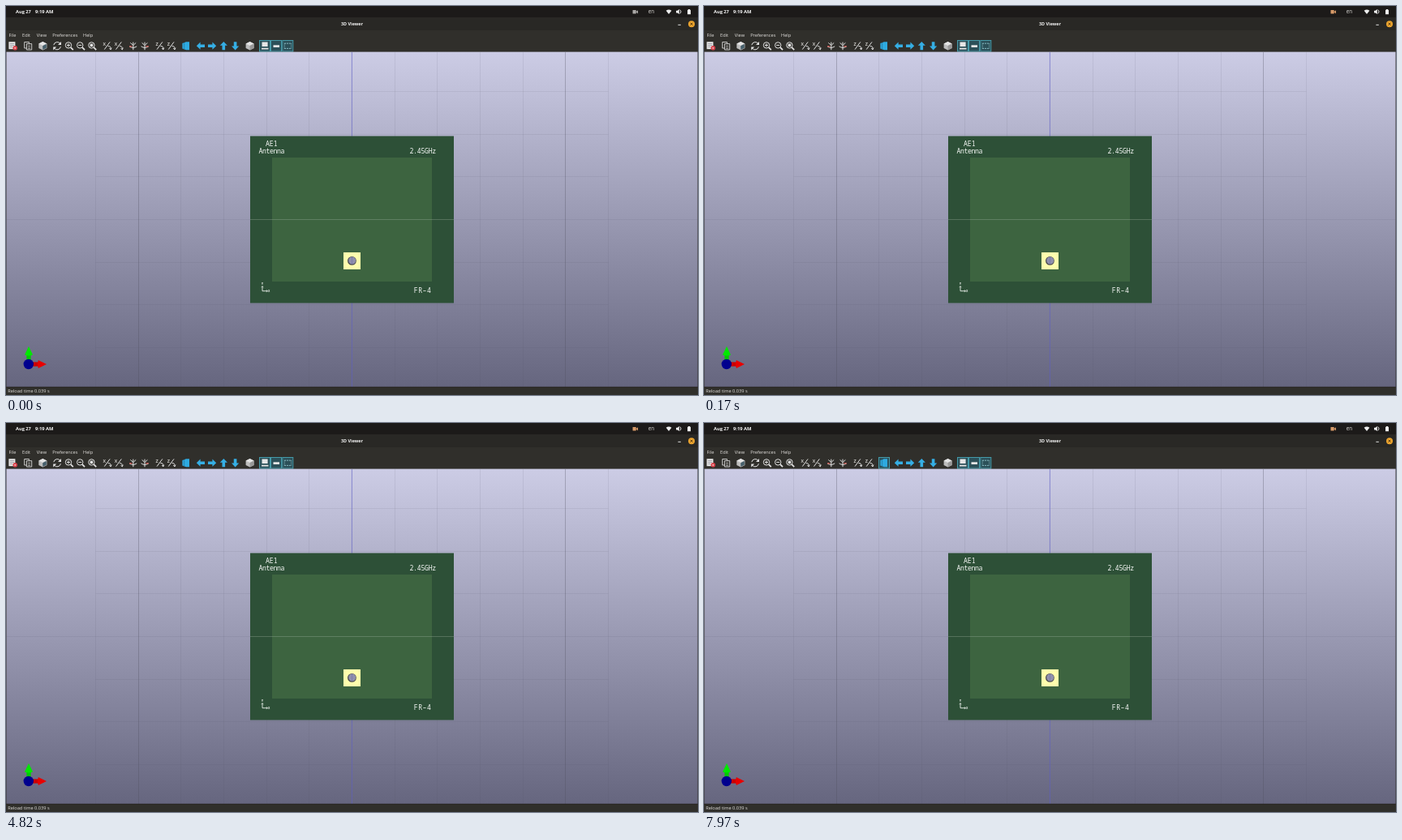
Animation, 853 px wide and 480 px high, one loop 8 s. Source, as an HTML page:

```html
<!DOCTYPE html>
<html lang="en">
<head>
<meta charset="utf-8">
<title>3D Viewer</title>
<style>
  html, body { margin: 0; width: 100%; height: 100%; overflow: hidden; background: #302f2b; }
  svg { display: block; width: 853px; height: 480px; }
  text { font: 5.65px "Open Sans", "Noto Sans", sans-serif; fill: #e4e2df; white-space: pre; }
  .bold { font-weight: 700; fill: #f4f4f4; }
  .silk { font: 500 8.2px "Noto Sans Mono", "DejaVu Sans Mono", monospace; fill: #f6f8f6; }
  .tiny { font-size: 4px; font-weight: 700; }
  .mini { font-size: 5.6px; font-weight: 600; }
  .line { fill: none; stroke: #e2e2e2; stroke-width: 1; }
  .on { fill: #2c5059; stroke: #459aa9; stroke-width: 1; }
  .camera { fill: #aaa8a6; animation: record 8s step-end infinite; }
  .hover { opacity: 0; animation: hover 8s step-end infinite; }
  @keyframes record { 0% { fill: #aaa8a6; } 2.125%, 100% { fill: #d79a68; } }
  @keyframes hover { 0% { opacity: 0; } 99%, 100% { opacity: 1; } }
</style>
</head>
<body>
<svg viewBox="0 0 853 480">
  <defs>
    <linearGradient id="sky" x1="0" y1="0" x2="0" y2="1">
      <stop stop-color="#cccce5"/><stop offset="1" stop-color="#66667f"/>
    </linearGradient>
    <path id="arrow" d="M-5.2 0L-.4-4.6V-1.8H5V1.8H-.4V4.6Z" fill="#35aee4"/>
    <g id="lens" class="line">
      <circle cx="-.8" cy="-.8" r="3.7"/><path d="M2 2L5 5" stroke-width="1.7"/>
    </g>
    <!-- curved arrow around a slanted axis -->
    <path id="turn" class="line" d="M-3.4 4.6L3.4-4.6M1 .6Q4.8 0 4.4 4.6M2.6 3.2L4.4 4.8L5.4 2.6"/>
    <g id="spin">
      <path class="line" d="M0-4.8V4.8M-4.6 .6Q0 3.6 4.4 .4M-3.4-4L-.4-1.2M3.4-4L.4-1.2"/>
      <path d="M-4.8 .4H-1.4" stroke="#d95a54" stroke-width="1.2"/>
    </g>
    <g id="cube">
      <path d="M0-5L5-2.5V3L0 5.5L-5 3V-2.5Z" fill="#bdbdbd"/>
      <path d="M0-5L5-2.5L0 0L-5-2.5Z" fill="#e5e5e5"/>
      <path d="M0 0L5-2.5V3L0 5.5Z" fill="#989898"/>
    </g>
  </defs>

  <!-- desktop bar, title, menus -->
  <rect width="853" height="480" fill="#302f2b"/>
  <rect width="853" height="14" fill="#1c1a19"/>
  <rect y="14" width="853" height="16" fill="#292825"/>
  <text class="bold" x="12" y="9.2" style="font-size:5.7px">Aug 27</text>
  <text class="bold" x="36" y="9.2" style="font-size:5.8px">9:19 AM</text>
  <text class="bold" x="426.5" y="24.2" text-anchor="middle" style="font-size:5.4px">3D Viewer</text>
  <text x="791.7" y="9.2" style="font-size:6.2px">en</text>

  <g class="camera">
    <rect x="772.5" y="5" width="4.2" height="4.6" rx=".6"/>
    <path d="M776.4 7.2L779 5.2V9.4Z"/>
  </g>
  <g fill="#eee">
    <path d="M813.6 5.8Q817 3 820.4 5.8L817 10Z"/>
    <path d="M826 5.8H827.6L829.8 4V10L827.6 8.4H826Z"/>
    <path d="M840 4.7H841V4H843V4.7H844V10.2H840Z"/>
  </g>
  <path d="M830.8 4.6Q833.4 7 830.8 9.4" class="line" stroke-width=".8"/>
  <path d="M828.4 23.3H831.8" class="line"/>
  <circle cx="845" cy="22.2" r="4" fill="#eda52f"/>
  <path d="M843.5 20.7L846.5 23.7M846.5 20.7L843.5 23.7" stroke="#4b3311" stroke-width=".9"/>

  <text x="3.4" y="38">File</text>
  <text x="20" y="38">Edit</text>
  <text x="37.8" y="38">View</text>
  <text x="57.2" y="38">Preferences</text>
  <text x="95" y="38">Help</text>

  <!-- toolbar -->
  <rect x="3.4" y="44.2" width="8" height="9" fill="#e6e6e6"/>
  <path d="M4.8 46.5H10M4.8 48.5H10M4.8 50.5H8" stroke="#92949d" stroke-width=".8"/>
  <circle cx="11.2" cy="51.8" r="2.8" fill="#d8414b"/>
  <circle cx="11.2" cy="51.8" r=".9" fill="#f2dada"/>

  <g fill="#302f2b" stroke="#d8d8d8" stroke-width=".9">
    <path d="M22.7 44.5H28.4V52H22.7Z"/>
    <path d="M25.4 46.6H31.7V54H25.4Z"/>
    <path d="M27 49H30M27 50.8H30M27 52.5H30" stroke-width=".6"/>
  </g>
  <use href="#cube" x="45.3" y="49"/>
  <path d="M45.3 49.2L49.7 47.1V51.7L45.3 53.8Z" fill="#46606c"/>

  <path class="line" d="M58.8 48.2A4.5 4.5 0 0 1 66.8 46.3M67.4 50.2A4.5 4.5 0 0 1 59.4 52.1"/>
  <path d="M68 44V48H64ZM58.2 54.4V50.4H62.2Z" fill="#e2e2e2"/>

  <use href="#lens" x="77.8" y="49.2"/>
  <use href="#lens" x="92" y="49.2"/>
  <use href="#lens" x="106.2" y="49.2"/>
  <path class="line" d="M75 48.4H79M77 46.4V50.4M89.2 48.4H93.2"/>
  <rect x="103.6" y="46.6" width="3.6" height="3.6" fill="#e2e2e2"/>

  <use href="#turn" x="124.7" y="49"/>
  <use href="#turn" x="138.9" y="49"/>
  <text class="mini" x="119.6" y="48.6">X</text>
  <text class="mini" x="133.8" y="48.6">X</text>
  <use href="#spin" x="156.8" y="49.4"/>
  <use href="#spin" transform="translate(171 49.4) scale(-1 1)"/>
  <use href="#turn" x="189.4" y="49"/>
  <use href="#turn" x="203.6" y="49"/>
  <text class="mini" x="184.6" y="48.6">Z</text>
  <text class="mini" x="198.8" y="48.6">Z</text>

  <rect class="on hover" x="215.5" y="42.5" width="13" height="13.5"/>
  <path d="M217.4 46L222 44.2H226V54.2H222L217.4 52.6Z" fill="#2eaae0"/>
  <path d="M219.6 45V54" stroke="#23698a" stroke-dasharray="1.4 1"/>

  <use href="#arrow" x="240" y="49.2"/>
  <use href="#arrow" transform="translate(254 49.2) rotate(180)"/>
  <use href="#arrow" transform="translate(268.3 49.2) rotate(90)"/>
  <use href="#arrow" transform="translate(282.6 49.2) rotate(-90)"/>
  <use href="#cube" x="300.6" y="49"/>

  <g class="on">
    <rect x="312.5" y="42.5" width="13" height="13.5"/>
    <rect x="326.5" y="42.5" width="13" height="13.5"/>
    <rect x="340.8" y="42.5" width="13" height="13.5"/>
  </g>
  <path d="M315.5 44.6H322.6V50H315.5ZM315 51.8H323.5V53.6H315ZM329.5 48.2H337V51H329.5Z" fill="#e6e6e6"/>
  <path d="M343.3 46.2H351.8M343.3 52.4H351.8" stroke="#8fc3cb" stroke-dasharray="1.8 1"/>
  <path d="M343.4 46V52.5M351.6 46V52.5" stroke="#8fc3cb" stroke-width=".7" stroke-dasharray="1.6 1"/>

  <!-- 3D canvas -->
  <rect x=".5" y="56.6" width="852" height="413.4" fill="url(#sky)"/>
  <g id="grid" stroke="#50505f"></g>
  <path d="M426.4 57V470" stroke="#6060c4" stroke-opacity=".62"/>

  <rect x="301" y="160.5" width="251" height="206" fill="#2d5037"/>
  <rect x="328" y="187" width="197" height="153" fill="#3d6440"/>
  <path d="M301 263.5H552" stroke="#9aae9c" stroke-opacity=".36"/>
  <rect x="416" y="304" width="21" height="21" fill="#fffeae"/>
  <circle cx="426.4" cy="314.4" r="5.4" fill="#4c4c50"/>
  <circle cx="426.7" cy="314" r="4.5" fill="#8f8fac"/>
  <path d="M426.5 309.8V318.4" stroke="#7979ad" stroke-width=".8"/>

  <text class="silk" x="320" y="173.4" letter-spacing="-.1">AE1</text>
  <text class="silk" x="311.5" y="182.3" letter-spacing="-.42">Antenna</text>
  <text class="silk" x="497.4" y="182.3" letter-spacing="-.25">2.45GHz</text>
  <text class="silk" x="502.8" y="353.6" letter-spacing=".5">FR–4</text>
  <path d="M316 346V351.7H322" fill="none" stroke="#e8eee8" stroke-width=".9"/>
  <text class="silk tiny" x="314.7" y="344.4">Y</text>
  <text class="silk tiny" x="323" y="353.2">X</text>
  <path d="M314.8 347.2L316 345.5L317.2 347.2M320.8 350.5L322.8 351.7L320.8 352.9" fill="none" stroke="#e8eee8" stroke-width=".7"/>

  <!-- axis gizmo -->
  <path d="M25.4 430H30.6V440H25.4Z" fill="#00cc00"/>
  <path d="M28 420L33 430.6Q28 432.6 23 430.6Z" fill="#00e800"/>
  <path d="M30 439.4H41V444.6H30Z" fill="#cc0000"/>
  <path d="M50 442L39.8 447Q38 442 39.8 437Z" fill="#e80000"/>
  <circle cx="27.8" cy="442" r="6.2" fill="#00008e"/>

  <rect y="470" width="853" height="10" fill="#302f2b"/>
  <path d="M0 470.2H853" stroke="#252421" stroke-width=".8"/>
  <text x="2.2" y="477.2">Reload time 0.039 s</text>
</svg>
<script>
  const grid = document.getElementById("grid");
  const step = 52.65, midX = 426.5, midY = 263.5;

  function addLine(d, opacity) {
    const path = document.createElementNS("http://www.w3.org/2000/svg", "path");
    path.setAttribute("d", d);
    path.setAttribute("stroke-opacity", opacity);
    grid.append(path);
  }

  for (let i = -6; i <= 6; i++) {
    const x = Math.floor(midX + i * step) + 0.5;
    if (i) addLine(`M${x} 57V470`, Math.abs(i) === 5 ? 0.32 : 0.1);
  }
  for (let j = -3; j <= 3; j++) {
    const y = Math.floor(midY + j * step) + 0.5;
    addLine(j ? `M110.5 ${y}H742.5` : `M0 ${y}H853`, 0.1);
  }
</script>
</body>
</html>
```
